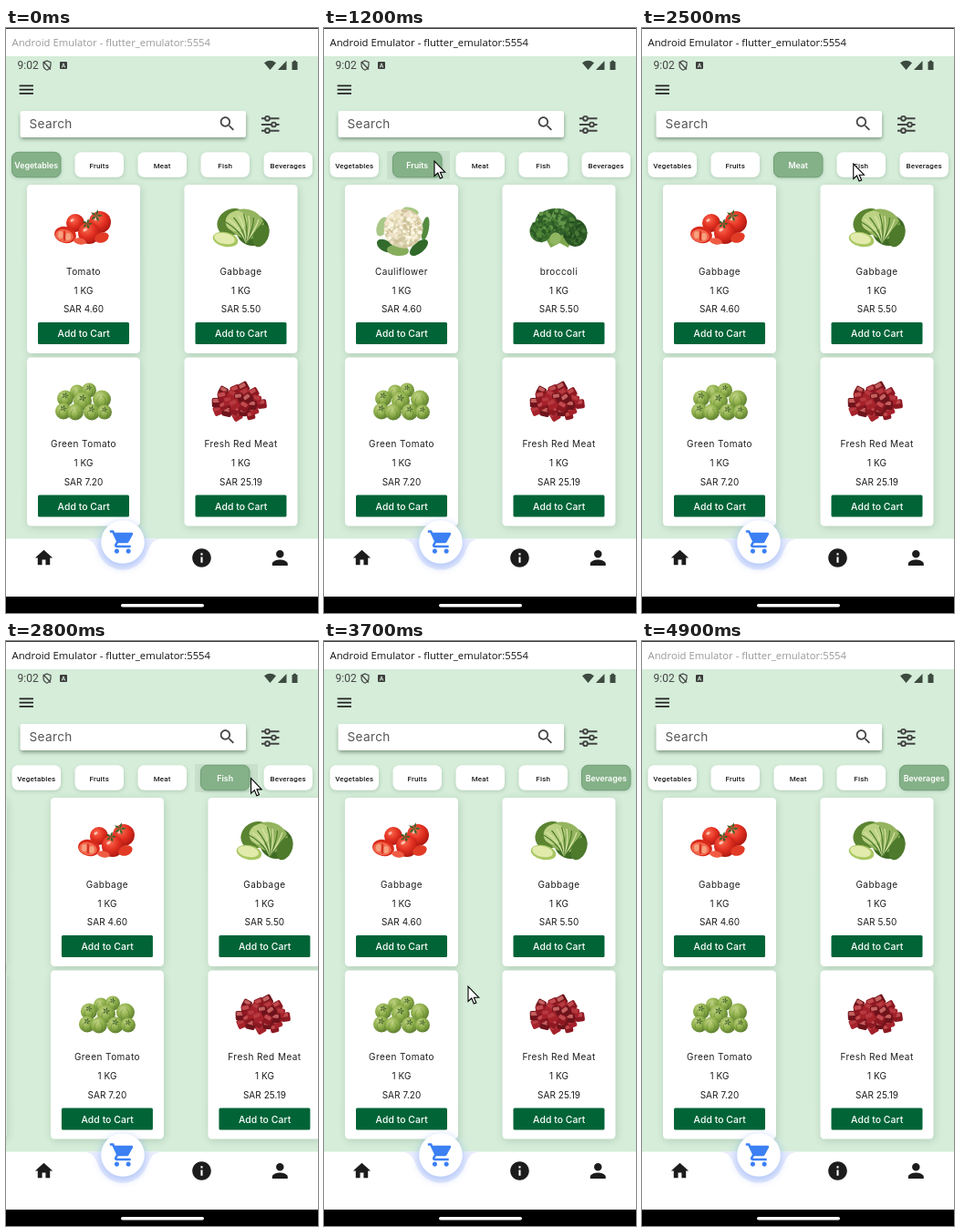
Recreate the animation shown at these times as an HTML page. Size 342 px wide and 642 px high, loop 5000 ms.

```html
<!DOCTYPE html>
<html lang="en">
<head>
<meta charset="utf-8">
<title>Grocery shop</title>
<style>
  html, body { margin: 0; width: 100%; height: 100%; overflow: hidden; background: #d5edd9; }
  svg { display: block; width: 342px; height: 642px; }
  .ui { font-family: Inter, "Open Sans", sans-serif; }
  .mid { text-anchor: middle; }
  .name { font-size: 10px; letter-spacing: .45px; }
  .info { font-size: 10px; letter-spacing: .05px; }
  .buy { font-size: 10.4px; font-weight: 500; letter-spacing: .05px; fill: #fff; }
  .tab { font: 500 8px Roboto, sans-serif; letter-spacing: .2px; }
  .tab.on { font: 600 8.8px Inter, sans-serif; letter-spacing: 0; }
</style>
</head>
<body>
<svg id="stage" viewBox="0 0 342 642" xmlns="http://www.w3.org/2000/svg"></svg>
<script>
const LOOP = 5000, STEP = 100, CELL = 172.5;
const TABS = ['Vegetables', 'Fruits', 'Meat', 'Fish', 'Beverages'];
// Tab n opens at OPENS[n - 1].
const OPENS = [830, 1866, 2600, 3200];
const SCROLL_TIME = 300;
const POINTER = [
  [100, 146, 630], [650, 121, 146], [1350, 121, 146], [1700, 186, 149], [1900, 200.5, 148.5],
  [2200, 231, 149], [2600, 232, 149], [2950, 296, 152], [3100, 296, 153], [3300, 251, 181],
  [3700, 158, 379], [4100, 156, 400], [4500, 150, 640]
];

const stage = document.getElementById('stage');
const clamp = v => Math.min(1, Math.max(0, v));

// Cubic Bezier ease with handles (.25, .1) and (.25, 1).
function ease(time) {
  const u = clamp(time);
  let low = 0, high = 1;
  for (let i = 0; i < 24; i++) {
    const s = (low + high) / 2;
    if (.75 * s * (1 - s) + s ** 3 < u) low = s; else high = s;
  }
  return clamp(.3 * low * (1 - low) ** 2 + 3 * low * low * (1 - low) + low ** 3);
}

function random(seed) {
  return () => (seed = (seed * 16807) % 2147483647) / 2147483647;
}
const circle = (x, y, r, fill, more = '') => `<circle cx="${x}" cy="${y}" r="${r}" fill="${fill}" ${more}/>`;
const oval = (x, y, rx, ry, fill, turn = 0) =>
  `<ellipse cx="${x}" cy="${y}" rx="${rx}" ry="${ry}" fill="${fill}" transform="rotate(${turn} ${x} ${y})"/>`;
const box = (x, y, w, h, r, fill, more = '') =>
  `<rect x="${x}" y="${y}" width="${w}" height="${h}" rx="${r}" fill="${fill}" ${more}/>`;
const text = (x, y, cls, str, more = '') => `<text x="${x}" y="${y}" class="${cls}" ${more}>${str}</text>`;
const icon = (x, y, s, d, fill) =>
  `<path transform="translate(${x} ${y}) scale(${s}) translate(-12 -12)" d="${d}" fill="${fill}"/>`;

// Small dabs spread evenly inside an ellipse.
function scatter(seed, n, cx, cy, rx, ry, size, colors) {
  const rnd = random(seed);
  let out = '';
  for (let i = 0; i < n; i++) {
    const a = rnd() * 6.283, d = Math.sqrt(rnd());
    const x = (cx + rx * d * Math.cos(a)).toFixed(1), y = (cy + ry * d * Math.sin(a)).toFixed(1);
    out += circle(x, y, (size * (.6 + .7 * rnd())).toFixed(1), colors[Math.floor(rnd() * colors.length)]);
  }
  return out;
}
const calyx = (x, y, s, fill) => [0, 72, 144, 216, 288].map(a =>
  `<path d="M0 0L${-s * .2} ${-s * .5}L0 ${-s}L${s * .2} ${-s * .5}Z" fill="${fill}" transform="translate(${x} ${y}) rotate(${a + 15})"/>`).join('');

function tomatoes() {
  const whole = (x, y, r) => circle(x, y, r, 'url(#red)') + oval(x - r * .35, y - r * .3, r * .22, r * .13, '#ffc0ae', -30);
  return whole(53, 42, 10) + whole(80, 41, 12) + calyx(76, 34, 7, '#47662c') + whole(68, 53, 12) +
    calyx(66, 43, 6, '#3f5e28') + oval(42, 55, 12, 9, '#d92a1b', 12) + oval(41, 56, 10, 7, '#f2694f', 12) +
    oval(37, 55, 3, 4, '#f7a17f') + oval(45, 57, 3, 4, '#f7a17f') + oval(41, 56, 1.3, 6, '#d63220') +
    oval(82, 58, 8, 5.500, '#e23b26', -20) + oval(58, 62, 7, 3.5, '#ef5b43', 10);
}

function cabbage() {
  let out = oval(52, 41, 17, 14, '#5b8431', -35) + oval(75, 50, 18, 17, '#3f6b25') +
    oval(68, 43, 20, 16, '#94b45f', 20) + oval(84, 56, 8, 13, '#4e7a2c', 25) + oval(57, 40, 12, 11, '#bcd283', -20);
  for (let i = 0; i < 9; i++)
    out += `<path d="M68 64Q${58 + i * 3} 47 ${43 + i * 5.5} ${32 + Math.abs(i - 4) * 2}" fill="none" stroke="${i % 2 ? '#d7e4a6' : '#4c7a2b'}" stroke-width="1.2"/>`;
  return out + oval(45, 60, 14, 8, '#a9c763', 12) + oval(44, 59, 11.5, 6, '#e2ebac', 12);
}

const cauliflower = () =>
  oval(44, 67, 10, 6, '#326b2c', 30) + oval(81, 69, 12, 6, '#2f6828', -40) + oval(88, 48, 4, 13, '#548b3f', 10) +
  oval(41, 46, 6, 11, '#a9c787', 20) + oval(72, 29, 9, 4, '#a6c782', 15) + oval(58, 72, 12, 6, '#86ad5c', 5) +
  circle(64, 48, 21.5, '#d8d0ac') +
  scatter(7, 230, 64, 48, 20.5, 20, 1.9, ['#f6efd6', '#e9dfbd', '#fbf7e6', '#cfc39a', '#efe0c8']);

const broccoli = () =>
  `<path d="M42 50L53 69L63 64L72 69L82 52Z" fill="#7fa74f"/>` +
  oval(59, 41, 23, 15, '#31602a') + oval(42, 51, 12, 12, '#3c702f') + oval(80, 53, 13, 15, '#2b5724') +
  oval(58, 59, 6, 7, '#92b762', 25) +
  scatter(21, 110, 59, 39, 21, 13, 1.9, ['#2c5a25', '#4c8237', '#3b6f2e', '#63964a']) +
  scatter(5, 50, 42, 51, 11, 11, 1.8, ['#2b5825', '#518839', '#3d722f']) +
  scatter(9, 60, 80, 53, 12, 13, 1.8, ['#234c20', '#467936', '#356629']);

function greenTomatoes() {
  const spots = [[55, 38, 8], [68, 36, 8], [42, 45, 9], [82, 46, 10], [61, 48, 10], [40, 59, 9], [53, 60, 9], [71, 60, 9], [85, 60, 8]];
  return spots.map(([x, y, r], i) => circle(x, y, r, 'url(#green)') +
    `<path d="M${x - 2} ${y - r * .4}q${-r * .5} ${r * .5} ${-r * .2} ${r}M${x + 1} ${y - r * .4}q${r * .5} ${r * .5} ${r * .2} ${r}" fill="none" stroke="#56772c" stroke-width=".8" opacity=".55"/>` +
    (i % 3 ? calyx(x, y - r * .35, r * .45, '#45672a') : '')).join('');
}

function redMeat() {
  const rnd = random(33);
  let out = oval(59, 50, 24, 14, '#74151d');
  for (let i = 24; i > 0; i--) {
    const a = i * 2.4, d = Math.sqrt(i / 24);
    const x = 59 + 28 * d * Math.cos(a), y = 49 + 17 * d * Math.sin(a), s = 9 + rnd() * 2;
    out += `<g transform="translate(${x.toFixed(1)} ${y.toFixed(1)}) rotate(${Math.round(rnd() * 80 - 40)})">` +
      box(-s / 2, -s / 2, s, s, 2, ['#8c1822', '#a5222b', '#6e131b'][i % 3]) +
      box(-s / 2 + 1, -s / 2 + 1, s * .7, s * .4, 1.2, ['#c04a4d', '#b63a40', '#c4605f'][i % 3]) + '</g>';
  }
  return out;
}

const art = { tomatoes, cabbage, cauliflower, broccoli, greenTomatoes, redMeat };
const photos = Object.entries(art).map(([id, draw]) => `<g id="${id}">${draw()}</g>`).join('');

function card(x, y, photo, name, price) {
  return `<g transform="translate(${x} ${y})">` +
    box(1, 2, 124, 185, 5, '#385a40', 'opacity=".2" filter="url(#soft)"') + box(0, 0, 124, 185, 4.5, '#fff') +
    `<use href="#${photo}"/>` +
    text(62, 98.500, 'mid name', name) + text(62, 119.500, 'mid info', '1 KG') + text(62, 140.300, 'mid info', 'SAR ' + price) +
    box(12, 151, 100, 24, 1.5, '#006437') + text(62.2, 167.300, 'mid buy', 'Add to Cart') + '</g>';
}

function cards() {
  let out = '';
  for (let i = 0; i < TABS.length * 2; i++) {
    const page = i >> 1, right = i % 2, x = 23 + i * CELL;
    const photo = page === 1 ? ['cauliflower', 'broccoli'] : ['tomatoes', 'cabbage'];
    const names = [['Tomato', 'Gabbage'], ['Cauliflower', 'broccoli']][page] || ['Gabbage', 'Gabbage'];
    out += card(x, 172, photo[right], names[right], right ? '5.50' : '4.60') +
      (right ? card(x, 361.5, 'redMeat', 'Fresh Red Meat', '25.19') : card(x, 361.5, 'greenTomatoes', 'Green Tomato', '7.20'));
  }
  return out;
}

const slider = (y, x) => `<path d="M280 ${y}H${x - 2.4}M${x + 2.4} ${y}H299.5"/><circle cx="${x}" cy="${y}" r="2.4"/>`;
const shape = {
  menu: 'M3 18h18v-2H3v2zm0-5h18v-2H3v2zm0-7v2h18V6H3z',
  search: 'M15.5 14h-.79l-.28-.27C15.41 12.59 16 11.11 16 9.5 16 5.91 13.09 3 9.5 3S3 5.91 3 9.5 5.91 16 9.5 16c1.61 0 3.09-.59 4.23-1.57l.27.28v.79l5 4.99L20.49 19l-4.99-5zm-6 0C7.01 14 5 11.99 5 9.5S7.01 5 9.5 5 14 7.01 14 9.5 11.99 14 9.5 14z',
  home: 'M10 20v-6h4v6h5v-8h3L12 3 2 12h3v8z',
  info: 'M12 2C6.48 2 2 6.48 2 12s4.48 10 10 10 10-4.48 10-10S17.52 2 12 2zm1 15h-2v-6h2v6zm0-8h-2V7h2v2z',
  person: 'M12 12c2.21 0 4-1.79 4-4s-1.79-4-4-4-4 1.79-4 4 1.79 4 4 4zm0 2c-2.67 0-8 1.34-8 4v2h16v-2c0-2.66-5.33-4-8-4z',
  cart: 'M7 18c-1.1 0-1.99.9-1.99 2S5.9 22 7 22s2-.9 2-2-.9-2-2-2zM1 2v2h2l3.6 7.59-1.35 2.45c-.16.28-.25.61-.25.96 0 1.1.9 2 2 2h12v-2H7.42c-.14 0-.25-.11-.25-.25l.03-.12.9-1.63h7.45c.75 0 1.41-.41 1.75-1.03l3.58-6.49A1.003 1.003 0 0 0 20 4H5.21l-.94-2H1zm16 16c-1.1 0-1.99.9-1.99 2s.89 2 1.99 2 2-.9 2-2-.9-2-2-2z'
};

const header =
  box(0, 0, 342, 31, 0, '#fff') + box(0, 0, 342, 1, 0, '#333') +
  text(6.5, 20, '', 'Android Emulator - flutter_emulator:5554', 'id="title" font-family="Open Sans, sans-serif" font-size="11.3"') +
  text(12.5, 45, '', '9:02', 'font-family="Roboto, sans-serif" font-size="12" fill="#444"') +
  '<path d="M45 36l4 1.6v3c0 2.5-1.6 4.6-4 5.6-2.4-1-4-3.1-4-5.6v-3zM41 37l8 8.5" fill="none" stroke="#444" stroke-width="1.2"/>' +
  box(59, 37, 8, 8, 1, '#3d3d3d') + '<path d="M61.2 43.5L63 38.8L64.8 43.5M61.9 42h2.2" fill="none" stroke="#d5edd9" stroke-width=".9"/>' +
  '<path d="M283 38.2Q289.5 33.5 296 38.2L289.5 46ZM298 46L307.5 36V46ZM313.5 37h1.5v-1.2h3V37h1.5v9h-6z" fill="#3d4a40"/>' +
  icon(22.3, 67.7, .85, shape.menu, '#222') +
  box(16, 94, 247, 28, 2, '#26402c', 'opacity=".5" filter="url(#tight)"') + box(15.5, 91, 247.5, 29, 2, '#fff') +
  text(25.5, 109.8, '', 'Search', 'font-size="13.6" letter-spacing=".35" fill="#555"') +
  icon(242.6, 105.2, .87, shape.search, '#444') +
  `<g fill="none" stroke="#444" stroke-width="1.9">${slider(99.3, 286.5)}${slider(106, 293.5)}${slider(112.7, 286.5)}</g>`;

const tabs = TABS.map((name, i) => {
  const x = 6.5 + 69 * i;
  return box(x - 6.5, 135, 69, 31, 1, '#1f3324', 'class="ripple" opacity="0"') +
    box(x, 138, 54, 27, 7, '#385a40', 'opacity=".22" filter="url(#tight)"') +
    box(x, 136.3, 53.5, 27.5, 7, '#fff', 'class="chip"') + text(x + 26.7, 153.6, 'mid tab', name);
}).join('');

const footer =
  box(0, 560.5, 342, 64, 0, '#fff') +
  '<path d="M84 560.5C99 561 99 573 104 581A28 28 0 0 0 152 581C157 573 157 561 172 560.5Z" fill="#e9ecfc"/>' +
  circle(128, 567, 25, '#5b8df5', 'opacity=".4" filter="url(#glow)"') +
  circle(128, 564, 23.8, '#fff') + icon(127.8, 564, 1.27, shape.cart, '#3c80f4') +
  icon(41.5, 581.5, .96, shape.home, '#1c1c1c') + icon(214.5, 581.5, 1.03, shape.info, '#1c1c1c') +
  icon(300.3, 581.5, 1.06, shape.person, '#1c1c1c') +
  box(0, 624, 342, 18, 0, '#000') + box(126, 632, 91, 3.6, 1.8, '#fff');

const blur = (id, d) => `<filter id="${id}" x="-50%" y="-50%" width="200%" height="200%"><feGaussianBlur stdDeviation="${d}"/></filter>`;
const ball = (id, ...colors) => `<radialGradient id="${id}" cx=".38" cy=".32" r=".75">` +
  colors.map((c, i) => `<stop offset="${i / 2}" stop-color="${c}"/>`).join('') + '</radialGradient>';

stage.innerHTML =
  `<defs>${blur('soft', 4)}${blur('tight', 2.2)}${blur('glow', 4)}` +
  ball('red', '#fb6a50', '#e23021', '#a5140f') + ball('green', '#c5d688', '#8fb04b', '#53742a') + photos +
  '<clipPath id="view"><rect y="166" width="342" height="394.5"/></clipPath></defs>' +
  box(0, 0, 342, 642, 0, '#d5edd9') +
  `<g class="ui" fill="#1c1c1c"><g clip-path="url(#view)"><g id="list">${cards()}</g></g>${header}${tabs}${footer}</g>` +
  '<path id="pointer" d="M0 0V16.5L3.8 13L6.3 19L8.9 18L6.4 12.2H11.7Z" fill="#fff" stroke="#000" stroke-width="1.1"/>';

const list = document.getElementById('list');
const title = document.getElementById('title');
const pointer = document.getElementById('pointer');
const chips = [...stage.querySelectorAll('.chip')];
const labels = [...stage.querySelectorAll('.tab')];
const ripples = [...stage.querySelectorAll('.ripple')];

function pointerAt(t) {
  const i = POINTER.findIndex(p => p[0] >= t);
  if (i < 1) return POINTER[i < 0 ? POINTER.length - 1 : 0].slice(1);
  const [t0, x0, y0] = POINTER[i - 1], [t1, x1, y1] = POINTER[i];
  const u = (t - t0) / (t1 - t0);
  return [x0 + (x1 - x0) * u, y0 + (y1 - y0) * u];
}

function render(t) {
  const progress = OPENS.map(open => ease((t - open) / SCROLL_TIME));
  const pages = progress.reduce((a, b) => a + b);
  list.setAttribute('transform', `translate(${-pages * 2 * CELL} 0)`);
  // The chip changes colour at once, its typeface halfway through the scroll.
  const active = progress.filter(p => p > 0).length, styled = Math.round(pages);
  TABS.forEach((_, i) => {
    chips[i].setAttribute('fill', i === active ? '#85b188' : '#fff');
    chips[i].setAttribute('stroke', i === active ? '#6f9f75' : 'none');
    labels[i].setAttribute('fill', i === active ? '#fff' : '#1c1c1c');
    labels[i].classList.toggle('on', i === styled);
    const age = i ? t - OPENS[i - 1] : -1;
    ripples[i].setAttribute('opacity', .065 * clamp((age - 35) / 60) * clamp((480 - age) / 100));
  });
  title.setAttribute('fill', t >= 700 && t < 4900 ? '#111' : '#999');
  const [x, y] = pointerAt(t);
  pointer.setAttribute('transform', `translate(${x} ${y})`);
  pointer.setAttribute('visibility', t >= 100 && t <= 4500 ? 'visible' : 'hidden');
}

const start = performance.now();
function tick() {
  const t = (performance.now() - start) % LOOP;
  render(Math.floor(t / STEP) * STEP);
  requestAnimationFrame(tick);
}
render(0);
requestAnimationFrame(tick);
</script>
</body>
</html>
```
